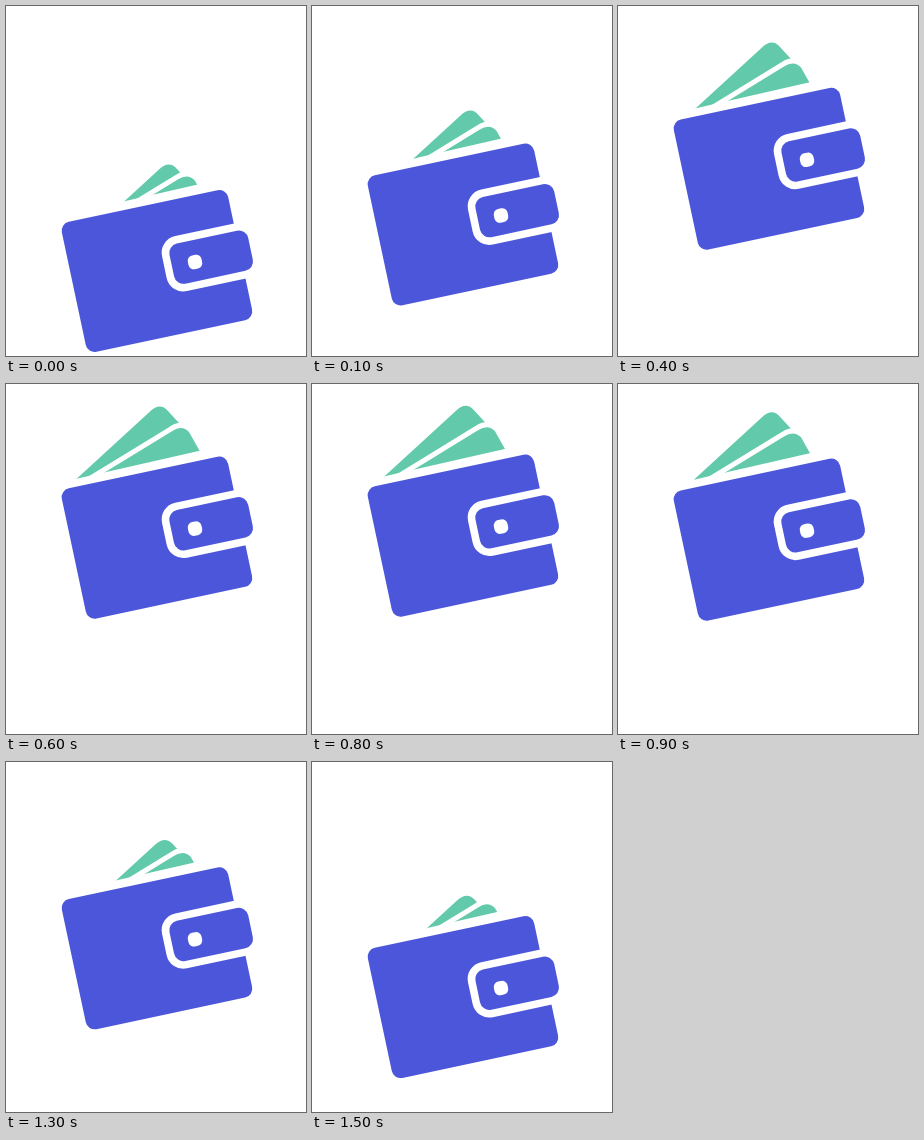
An HTML page that plays this animation: 300x350 px, repeating every 1600 ms.

```html
<!DOCTYPE html>
<html lang="en">
<head>
<meta charset="utf-8">
<title>Wallet</title>
<style>
  html, body { margin: 0; width: 100%; height: 100%; overflow: hidden; background: #fff; }
  svg { display: block; width: 300px; height: 350px; }
  .note { fill: #62caaa; }
  .blue { fill: #4c56db; }
  .white { fill: #fff; }
  .outlined { stroke: #fff; paint-order: stroke; }
</style>
</head>
<body>
<svg viewBox="0 0 300 350">
  <g id="wallet">
    <path id="back" class="note" d="M42 120 L144 26.5 Q154 17 162 26 L173 38 L177 43 V140 H42Z"/>
    <path id="front" class="note outlined" stroke-width="10"
      d="M78 100 L166 46.2 Q176 39.5 183 47 L205 86 V130 H78Z"/>
    <path class="white" d="M20 105.7 L230 57.8 V240 H20Z"/>
    <rect class="blue" width="170" height="133" rx="9" transform="translate(54 105.6) rotate(-12)"/>
    <rect class="blue outlined" width="80.5" height="41" rx="9.5" stroke-width="15.2"
      transform="translate(161.5 127.5) rotate(-12)"/>
    <rect class="white" x="182" y="137" width="14" height="14" rx="5.5" transform="rotate(-12 189 144)"/>
  </g>
</svg>
<script>
  const LOOP = 1600, STEP = 100;

  // key points as [time, value]
  const drop = [[0, 112], [200, 19], [700, -4], [1200, 19], [1600, 112]];
  const tuck = [[0, 25], [200, 10], [700, -2], [1200, 10], [1300, 23], [1500, 30], [1600, 25]];
  const slide = [[0, 9], [200, 0], [1200, 0], [1300, 5], [1500, 1], [1600, 9]];

  // rising values are eased by the given power, falling ones run evenly
  function valueAt(keys, t, power = 1) {
    const i = keys.findIndex(([time]) => time > t);
    const [t0, a] = keys[i - 1], [t1, b] = keys[i];
    const k = (t - t0) / (t1 - t0);
    return a + (b - a) * (b > a ? k ** power : k);
  }

  const [wallet, back, front] = ['wallet', 'back', 'front'].map(id => document.getElementById(id));
  const move = (el, x, y) => el.setAttribute('transform', `translate(${x} ${y})`);

  function draw(now) {
    const t = Math.floor((now % LOOP) / STEP) * STEP;
    const x = valueAt(slide, t), y = valueAt(tuck, t, 0.75);
    move(wallet, 0, valueAt(drop, t, 1.35));
    move(back, x, y);
    // the front note follows the back one over a shorter distance
    move(front, x * x / 14, y / (1 + y / 40));
  }

  const start = performance.now();
  function tick() {
    draw(performance.now() - start);
    requestAnimationFrame(tick);
  }
  tick();
</script>
</body>
</html>
```
